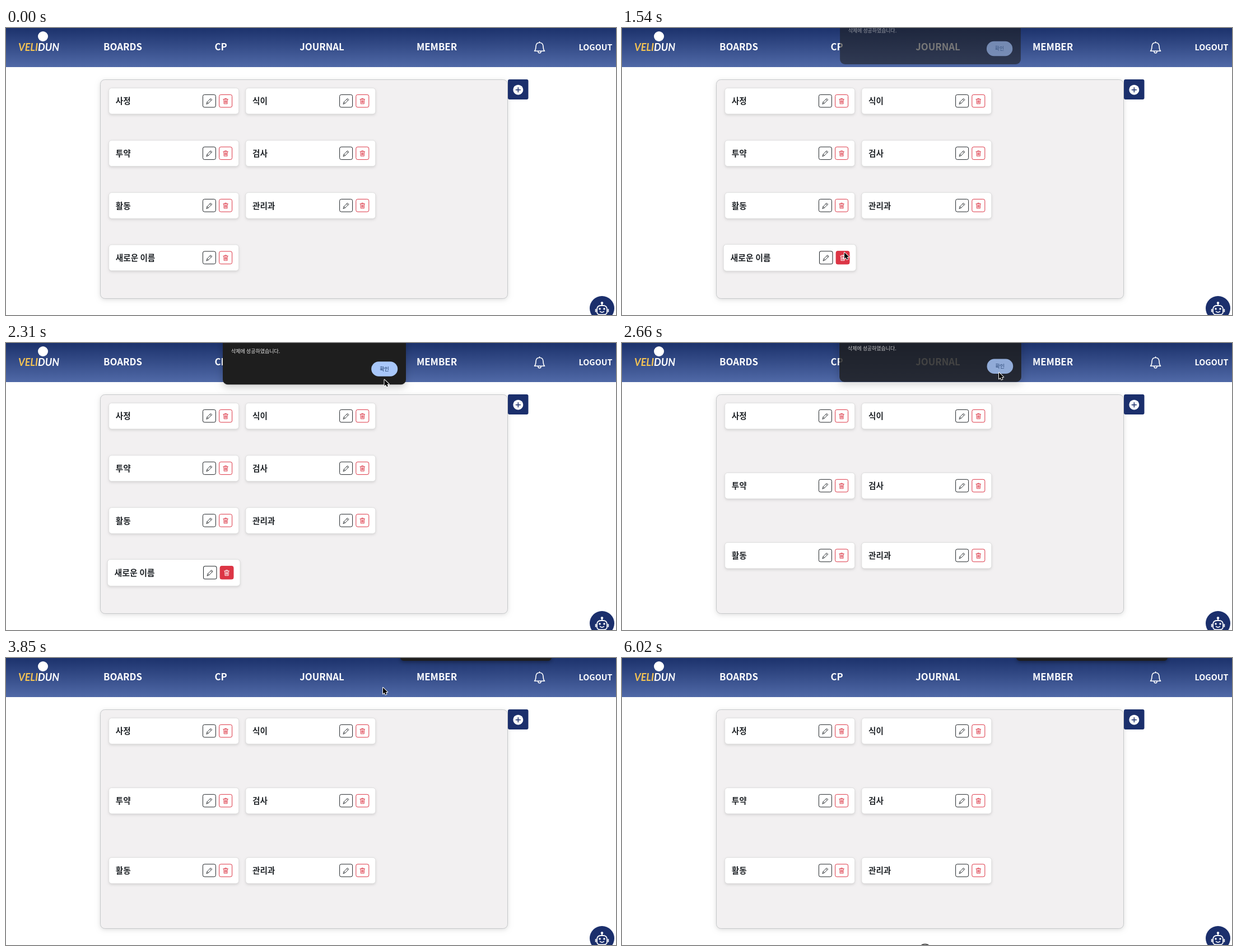
Write an HTML page with a canvas that moves like this. It is 1089 px wide and 514 px high and loops after 6.09 s.

```html
<!DOCTYPE html>
<html lang="ko">
<head>
<meta charset="utf-8">
<title>Board settings</title>
<style>
html, body { margin: 0; width: 100%; height: 100%; overflow: hidden; background: #fff; }
canvas { display: block; width: 1089px; height: 514px; }
</style>
</head>
<body>
<canvas id="stage" width="1089" height="514"></canvas>
<script>
const ctx = document.getElementById('stage').getContext('2d');
const LOOP = 6090, STEP = 70;
const NAVY = '#1b2f6c', RED = '#dc3545', INK = '#212529', DARK = '#1e1e1e';
const SANS = '"Noto Sans CJK KR", "Noto Sans CJK", "Noto Sans", sans-serif';

const clamp = v => Math.max(0, Math.min(1, v));
const span = (t, a, b) => clamp((t - a) / (b - a));
const ease = k => k * k * (3 - 2 * k);
const mix = (a, b, k) => a + (b - a) * k;

function box(x, y, w, h, r, fill, stroke, shadow) {
  ctx.save();
  ctx.beginPath();
  ctx.roundRect(x, y, w, h, r);
  if (shadow) {
    [ctx.shadowOffsetY, ctx.shadowBlur] = shadow;
    ctx.shadowColor = `rgba(0,0,0,${shadow[2]})`;
  }
  if (fill) { ctx.fillStyle = fill; ctx.fill(); }
  ctx.shadowColor = 'transparent';
  if (stroke) { ctx.strokeStyle = stroke; ctx.lineWidth = 1; ctx.stroke(); }
  ctx.restore();
}

function disc(x, y, r, fill) {
  ctx.beginPath();
  ctx.arc(x, y, r, 0, 7);
  ctx.fillStyle = fill;
  ctx.fill();
}

function text(s, x, y, font, color, align = 'left') {
  ctx.font = font;
  ctx.fillStyle = color;
  ctx.textAlign = align;
  ctx.fillText(s, x, y);
}

// Draws an SVG path with its origin at x, y.
function shape(d, x, y, { fill, stroke, width = 1 }) {
  const path = new Path2D(d);
  ctx.save();
  ctx.translate(x, y);
  ctx.lineJoin = ctx.lineCap = 'round';
  if (fill) { ctx.fillStyle = fill; ctx.fill(path); }
  if (stroke) { ctx.strokeStyle = stroke; ctx.lineWidth = width; ctx.stroke(path); }
  ctx.restore();
}

const PENCIL = 'M-5 5L-3.8 1.6L2.6 -4.8L4.8 -2.6L-1.6 3.8ZM1.2 -3.4L3.4 -1.2M-3.8 1.6L-1.6 3.8';
const TRASH = 'M-4.3 -3.3H4.3M-1.5 -3.5V-4.7H1.5V-3.5M-3.4 -3L-3 4.8H3L3.4 -3M-1.4 -1.2V3M0 -1.2V3M1.4 -1.2V3';
const BELL = 'M-9 6.2C-6.4 4 -6.8 0 -6.4 -3C-6 -6.6 -3.4 -8.8 0 -8.8C3.4 -8.8 6 -6.6 6.4 -3C6.8 0 6.4 4 9 6.2ZM-2.6 7.4C-2.2 10.6 2.2 10.6 2.6 7.4M0 -9V-10.2';
const ARROW = 'M0 0V11.2L2.6 8.8L4.3 12.7L6.3 11.8L4.7 8.1H8.2Z';
const HAND = 'M-2.6 2V-5.2C-2.6 -6.8 -.5 -6.8 -.5 -5.2V-1.4C0 -2.3 1.5 -2.1 1.6 -1C2.2 -1.7 3.6 -1.5 3.7 -.3C4.3 -.9 5.6 -.6 5.6 .6V3C5.6 5 4.5 5.4 4.4 7H-1.6C-1.8 5 -4.2 3.4 -5.6 1C-6 -.3 -4.5 -.7 -3.7 .3Z';

function header() {
  const g = ctx.createLinearGradient(0, 0, 0, 70);
  g.addColorStop(0, '#1c326c');
  g.addColorStop(1, '#5069a7');
  ctx.fillStyle = g;
  ctx.fillRect(0, 0, 1089, 70);

  disc(66, 15, 9, '#fff');
  const brand = 'italic 700 18px Lato, sans-serif';
  text('VELI', 22, 40.5, brand, '#f6c453');
  text('DUN', 22 + ctx.measureText('VELI').width, 40.5, brand, '#fff');

  const nav = [['BOARDS', 208.5], ['CP', 383.5], ['JOURNAL', 564], ['MEMBER', 769]];
  for (const [label, x] of nav) text(label, x, 40.3, `700 16.8px ${SANS}`, '#fff', 'center');
  text('LOGOUT', 1052.5, 39.5, `700 14.4px ${SANS}`, '#fff', 'center');
  shape(BELL, 952.5, 35, { stroke: '#fff', width: 1.6 });
}

function addButton() {
  box(896, 92, 36.5, 36, 3, NAVY);
  disc(914.3, 110.7, 9, '#fff');
  shape('M-4 0H4M0 -4V4', 914.3, 110.7, { stroke: NAVY, width: 1.5 });
}

function chatBot() {
  disc(1064, 502, 22, NAVY);
  const line = { stroke: '#fff', width: 1.8 };
  shape('M0 -8V-5M-9 6.5V1.5C-9 -2.5 -6 -5 -2 -5H2C6 -5 9 -2.5 9 1.5V6.5C9 10 6 11.5 3 11.5H-3C-6 11.5 -9 10 -9 6.5ZM-11.3 2V6M11.3 2V6', 1064, 502, line);
  disc(1064, 492.5, 2.2, '#fff');
  disc(1060, 503, 1.8, '#fff');
  disc(1068, 503, 1.8, '#fff');
  shape('M-3.5 5.5Q0 9 3.5 5.5', 1064, 502, { stroke: '#fff', width: 1.5 });
}

function card(label, x, y, hover = 0, red = 0) {
  ctx.save();
  ctx.translate(x + 116, y + 23.3);
  ctx.scale(1 + 0.021 * hover, 1 + 0.021 * hover);
  box(-116, -23.3, 232, 46.6, 5, '#fff', '#dedede', [2, 4, 0.13]);
  text(label, -103.8, 5.6, `600 14.6px ${SANS}`, INK);
  box(51.8, -11.4, 23, 22.6, 3, '#fff', INK);
  shape(PENCIL, 63.3, 0.2, { stroke: INK, width: 0.9 });
  box(81, -11.4, 23, 22.6, 3, '#fff', RED);
  shape(TRASH, 92.5, 0.2, { stroke: RED, width: 0.9 });
  if (red) {
    ctx.globalAlpha = red;
    box(81, -11.4, 23, 22.6, 3, RED, RED);
    shape(TRASH, 92.5, 0.2, { stroke: '#fff', width: 0.9 });
  }
  ctx.restore();
}

function board(t) {
  box(168.5, 92.5, 727, 392, 8, '#f2f0f1', '#c6c8ca', [2, 8, 0.14]);
  const removed = t >= 2660;
  const pitch = removed ? 124.9 : 93.6;
  ['사정', '식이', '투약', '검사', '활동', '관리과'].forEach((label, i) =>
    card(label, 183.6 + (i % 2) * 244.2, 107.5 + (i >> 1) * pitch));
  if (!removed) card('새로운 이름', 183.6, 388.1, ease(span(t, 1050, 1330)), span(t, 1050, 1260));
}

function alertBox(t) {
  if (t < 1540 || t >= 2870) return;
  const opening = t < 2310;
  // away: 0 when settled, grows as the dialog lifts and fades
  const away = opening ? 1 - ease(span(t, 1540, 1750)) : span(t, 2590, 2730) * 1;
  const alpha = opening ? 1 - 0.4 * away
    : t <= 2660 ? 1 - 0.34 * away
    : mix(0.83, 0, span(t, 2660, 2870));
  if (away < 0.9) {
    ctx.save();
    ctx.beginPath();
    ctx.rect(370, 0, 360, 100);
    ctx.roundRect(387, -40, 327, 115 - 10 * away, 9);
    ctx.clip('evenodd');
    ctx.globalAlpha = opening ? 1 - away : alpha;
    box(387, -40, 327, 115 - 10 * away, 9, '#555', null, [4, 14, 0.2]);
    ctx.restore();
  }
  ctx.save();
  ctx.globalAlpha = alpha;
  ctx.translate(550.5, -9.5 * away);
  ctx.scale(1 - 0.013 * away, 1);
  box(-163.5, -40, 327, 114.5, 9, DARK);
  text('삭제에 성공하였습니다.', -148.5, 17.8, `9px ${SANS}`, '#e8e8e8');
  box(101.7, 33.3, 47, 26.4, 13.2, '#a8c7fa');
  text('확인', 125, 49.8, `500 9px ${SANS}`, '#12305f', 'center');
  ctx.restore();
}

// Each leg: start, end, from x, y, to x, y.
const LEGS = [
  [140, 770, 541, 516, 397, 402],
  [1540, 2100, 397, 402, 676, 68],
  [2240, 2520, 676, 68, 673, 53],
  [4200, 4340, 673, 53, 695, 42],
  [5110, 5670, 695, 42, 424, 516]
];

function cursor(t) {
  if (t < 210 || t >= 5670) return;
  if (t >= 1050 && t < 1540) {
    shape(HAND, 396, 412, { fill: '#fff', stroke: '#111', width: 1 });
    return;
  }
  const [a, b, x0, y0, x1, y1] = LEGS.filter(leg => leg[0] <= t).pop();
  const k = ease(span(t, a, b));
  const x = mix(x0, x1, k), y = mix(y0, y1, k);
  shape(ARROW, x, y, { stroke: '#fff', width: 2 });
  shape(ARROW, x, y, { fill: '#000' });
}

function draw(t) {
  ctx.fillStyle = '#fff';
  ctx.fillRect(0, 0, 1089, 514);
  header();
  board(t);
  addButton();
  chatBot();
  alertBox(t);
  if (t >= 3850) box(704, -20, 270, 25, 6, DARK, null, [2, 7, 0.35]);
  if (t >= 6020) {
    ctx.beginPath();
    ctx.arc(541, 525, 12.5, 0, 7);
    ctx.strokeStyle = '#222';
    ctx.lineWidth = 1.3;
    ctx.stroke();
  }
  cursor(t);
}

const start = performance.now();
function tick() {
  const t = (performance.now() - start) % LOOP;
  draw(Math.floor(t / STEP) * STEP);
  requestAnimationFrame(tick);
}
tick();
</script>
</body>
</html>
```
